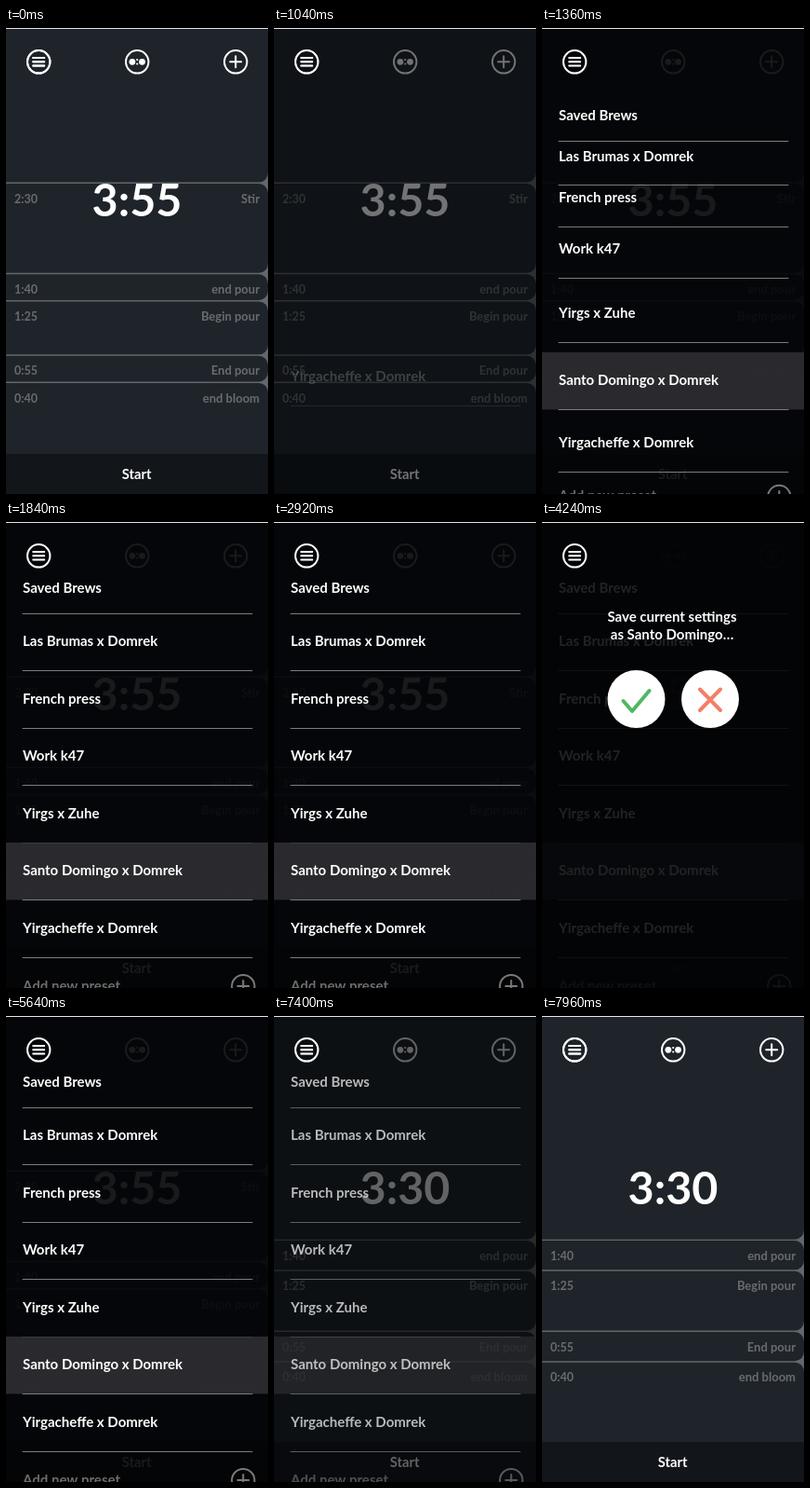
An HTML page with a canvas for the animation above (8000 ms loop, 282 px wide and 500 px high).

```html
<!DOCTYPE html>
<html lang="en">
<head>
<meta charset="utf-8">
<title>Brew timer</title>
<style>
html, body { margin: 0; width: 100%; height: 100%; overflow: hidden; background: #1f242a; }
canvas { display: block; }
</style>
</head>
<body>
<canvas id="stage" width="282" height="500"></canvas>
<script>
const W = 282, H = 500, LOOP = 8000, FOOT = 457;
const ctx = document.getElementById('stage').getContext('2d');
const FACE = 'Lato, "Open Sans", sans-serif';

const steps = [[100, 'end pour'], [85, 'Begin pour'], [55, 'End pour'], [40, 'end bloom']];
const brews = [
  { total: 235, steps: [[150, 'Stir'], ...steps] },
  { total: 210, steps }
];
const rows = ['Saved Brews', 'Las Brumas x Domrek', 'French press', 'Work k47',
  'Yirgs x Zuhe', 'Santo Domingo x Domrek', 'Yirgacheffe x Domrek', 'Add new preset'];
const CHOSEN = 5, ADD = 7;

const clamp = v => Math.max(0, Math.min(1, v));
const ramp = (t, start, len) => clamp((t - start) / len);
const easeOut = v => 1 - (1 - v) * (1 - v);
const clock = s => Math.floor(s / 60) + ':' + String(s % 60).padStart(2, '0');
const spring = u => Math.exp(-0.16 * u) * Math.cos(Math.PI * u / 3.1);

function text(str, x, y, size, color, align = 'left') {
  ctx.font = `700 ${size}px ${FACE}`;
  ctx.textAlign = align;
  ctx.fillStyle = color;
  ctx.fillText(str, x, y);
}

function lines(color, width, ...paths) {
  ctx.strokeStyle = color;
  ctx.lineWidth = width;
  ctx.beginPath();
  for (const path of paths) path.forEach(([x, y], i) => i ? ctx.lineTo(x, y) : ctx.moveTo(x, y));
  ctx.stroke();
}

function disc(x, y, r, color) {
  ctx.fillStyle = color;
  ctx.beginPath();
  ctx.arc(x, y, r, 0, 7);
  ctx.fill();
}

function ring(x, y, color = '#fff') {
  ctx.strokeStyle = color;
  ctx.lineWidth = 2;
  ctx.beginPath();
  ctx.arc(x, y, 12.2, 0, 7);
  ctx.stroke();
}

function plusIcon(x, y, color = '#fff') {
  ring(x, y, color);
  lines(color, 2, [[x - 6, y], [x + 6, y]], [[x, y - 6], [x, y + 6]]);
}

function menuIcon() {
  ring(35.2, 36.3);
  lines('#fff', 2, ...[32, 36.3, 40.6].map(y => [[29.2, y], [41.2, y]]));
}

function pairIcon() {
  ring(141.2, 36.3);
  for (const x of [135.9, 146.5]) disc(x, 36.3, 3.4, '#fff');
  for (const y of [34.1, 38.5]) disc(141.2, y, 1.1, '#fff');
}

function card(top, bottom, round) {
  ctx.beginPath();
  ctx.roundRect(-1, top, W + 1, bottom - top, [0, round ? 10 : 0, 10, 0]);
  ctx.fill();
}

function drawTimer({ total, steps }) {
  ctx.fillStyle = '#63666a';
  ctx.fillRect(0, 0, W, H);
  const edges = steps.map(s => FOOT * (1 - s[0] / total) + 1);
  ctx.fillStyle = '#1f242a';
  [0, ...edges].forEach((y, i) => {
    const last = i === edges.length;
    card(i ? y + 0.7 : 0, last ? FOOT + 20 : edges[i] - 0.7, i > 0);
  });
  steps.forEach(([s, label], i) => {
    text(clock(s), 9, edges[i] + 21.3, 12.5, '#696c6f');
    text(label, 273, edges[i] + 21.3, 13, '#696c6f', 'right');
  });
  ctx.fillStyle = '#12161b';
  ctx.fillRect(0, FOOT, W, H - FOOT);
  text('Start', 140.7, 484, 14.8, '#fff', 'center');
  text(clock(total), 141, 202, 48.5, '#fff', 'center');
  menuIcon();
  pairIcon();
  plusIcon(247.2, 36.3);
}

function shade(alpha) {
  ctx.globalAlpha = alpha;
  ctx.fillStyle = '#030406';
  ctx.fillRect(0, 0, W, H);
  ctx.globalAlpha = 1;
}

function drawRow(label, i, t, fade) {
  // Lower rows drop in first, the heading last.
  const u = (t - 1360) / 22 + i;
  const off = u > 21 ? 0 : 23 * spring(Math.max(u, -9.3));
  const y = (i ? 128 + 61.6 * (i - 1) : 71) + off;
  ctx.globalAlpha = fade * clamp((u + 9.3) / 4);
  if (i === CHOSEN) {
    ctx.fillStyle = 'rgba(49,49,53,0.85)';
    ctx.fillRect(0, y - 30.5, W, 61.5);
  }
  const add = i === ADD;
  text(label, 18, y + 5, 15, add ? '#6c6c6c' : '#fff');
  if (add) {
    plusIcon(255.3, y + 0.5, '#7a7a7a');
  } else {
    const rule = Math.round(y + (i ? 30.9 : 27)) + 0.5;
    lines('#7c7c7c', 1, [[18, rule], [265, rule]]);
  }
  ctx.globalAlpha = 1;
}

function drawMenu(t) {
  const shown = easeOut(ramp(t, 920, 320)) * (1 - easeOut(ramp(t, 7320, 460)));
  if (!shown) return;
  shade(0.91 * shown);
  const fade = 1 - ramp(t, 7320, 280);
  rows.forEach((label, i) => drawRow(label, i, t, fade));
}

function popIn(t, start, from, fade, draw) {
  const v = (t - start) / 22;
  if (v <= 0) return;
  ctx.save();
  ctx.globalAlpha = fade * clamp(v / 1.5);
  ctx.translate(0, v > 28 ? 0 : from * spring(v));
  draw();
  ctx.restore();
}

function drawDialog(t) {
  const fade = 1 - easeOut(ramp(t, 5160, 400));
  const shown = ramp(t, 3465, 130) * fade;
  if (!shown) return;
  shade(0.88 * shown);
  popIn(t, 3536, -100, fade, () => {
    text('Save current settings', 140, 107, 15, '#fff', 'center');
    text('as Santo Domingo…', 140, 126, 15, '#fff', 'center');
  });
  popIn(t, 3548, 120, fade, () => {
    disc(101.5, 190, 31, '#fff');
    lines('#4fb862', 4, [[87.5, 192], [97, 203], [115.5, 181]]);
  });
  popIn(t, 3561, 120, fade, () => {
    disc(181, 190, 31, '#fff');
    lines('#f47e68', 4, [[170, 179.5], [192, 202]], [[192, 179.5], [170, 202]]);
  });
}

function draw(t) {
  drawTimer(brews[t < 7320 ? 0 : 1]);
  drawMenu(t);
  drawDialog(t);
  menuIcon();
  ctx.fillStyle = '#e6e7e8';
  ctx.fillRect(0, 0, W, 1);
}

ctx.lineCap = ctx.lineJoin = 'round';
const began = performance.now();
function tick() {
  draw((performance.now() - began) % LOOP);
  requestAnimationFrame(tick);
}
tick();
</script>
</body>
</html>
```
